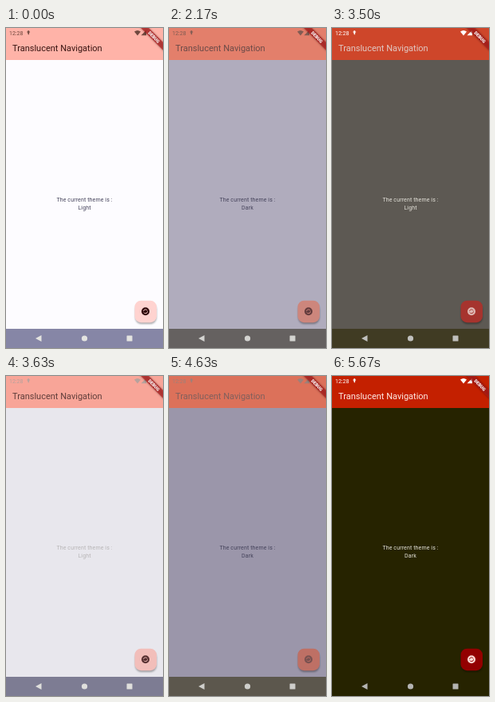
An HTML page for the animation above (5710 ms loop, 197x400 px).

```html
<!DOCTYPE html>
<html lang="en">
<head>
<meta charset="utf-8">
<title>Translucent Navigation</title>
<style>
  html, body { margin: 0; width: 100%; height: 100%; overflow: hidden; }
  svg { display: block; width: 100vw; height: 100vh; font-family: Roboto, Inter, sans-serif; }
  .body { font-size: 7px; letter-spacing: .125px; text-anchor: middle; }
  .debug { font-size: 5.6px; font-weight: 900; text-anchor: middle; fill: #fff; }
  .ring { fill: none; stroke-width: .9; stroke-dasharray: 6.4 1.5; }
</style>
</head>
<body>
<svg viewBox="0 0 197 400">
  <defs>
    <filter id="soft" x="-30%" y="-60%" width="160%" height="220%">
      <feGaussianBlur stdDeviation="1.2"/>
    </filter>
  </defs>

  <rect class="page" width="197" height="400"/>
  <rect class="bar" width="197" height="40"/>
  <text class="title" x="8" y="29" font-size="11">Translucent Navigation</text>

  <g class="status">
    <text x="4" y="8.6" font-size="7">12:28</text>
    <path d="M27.3 3.2h1.8v1.2h1v1h-1v1.6l-.9 1.8-.9-1.8V5.4h-1v-1h1z"/>
    <path d="M161 4.6Q165 1.4 169 4.6L165 9.4Z"/>
    <path d="M169.5 9.2L176 2.8V9.2Z"/>
  </g>

  <g class="body">
    <text x="98.5" y="217.3">The current theme is :</text>
    <text class="light" x="98.5" y="227.3">Light</text>
    <text class="dark" x="98.5" y="227.3">Dark</text>
  </g>

  <rect x="162" y="343.5" width="27" height="26.5" rx="8" fill="#000" opacity=".32" filter="url(#soft)"/>
  <rect class="fab" x="161.5" y="340.7" width="27.5" height="27.5" rx="8"/>
  <circle class="icon" cx="175" cy="354.3" r="5"/>
  <circle class="ring" cx="175" cy="354.3" r="2.5"/>

  <rect class="nav" y="376" width="197" height="24"/>
  <g class="keys">
    <path d="M37 388L44.5 384V392Z"/>
    <circle cx="98.5" cy="388" r="3.6"/>
    <rect x="151.5" y="384.5" width="7" height="7" rx=".5"/>
  </g>

  <g transform="translate(197 0) rotate(45)">
    <rect x="-24" y="12.6" width="48" height="7" fill="#000" opacity=".4" filter="url(#soft)"/>
    <rect x="-24" y="12.6" width="48" height="7" fill="#b71c1c" opacity=".68"/>
    <text class="debug" x="0" y="18.1">DEBUG</text>
  </g>
</svg>
<script>
  const LOOP = 5710;
  const FADE = 200;
  // [time of the toggle, theme it leads to]: 0 light, 1 dark
  const toggles = [[2100, 1], [3450, 0], [4540, 1]];

  // colours: light, dark and an optional tone halfway between
  function cycle(selector, prop, [light, dark, middle], lag = 0, fade = FADE) {
    const ends = [light, dark];
    const frames = [];
    const key = (time, value) => frames.push({ offset: time / LOOP, [prop]: value });
    key(0, light);
    for (const [time, theme] of toggles) {
      const start = time + (typeof lag === "function" ? lag(theme) : lag);
      key(start, ends[1 - theme]);
      if (middle) key(start + fade / 2, middle);
      key(start + fade, ends[theme]);
    }
    key(LOOP, dark);
    document.querySelector(selector).animate(frames, { duration: LOOP, iterations: Infinity });
  }

  const fab = ["#ffd3d0", "#930000", "#b8665a"];
  cycle(".page", "fill", ["#fdfcff", "#262300", "#918ca2"]);
  cycle(".bar", "fill", ["#ffb3a8", "#c42000", "#d86a52"]);
  cycle(".nav", "fill", ["#8686a6", "#262300", "#585244"]);
  cycle(".keys", "fill", ["#e4e4e0", "#b4b4b2"]);
  cycle(".fab", "fill", fab);
  cycle(".ring", "stroke", fab);
  // Text and icons trail the surfaces; system icons turn dark late.
  cycle(".title", "fill", ["#3a1512", "#ffe9e4"], 20);
  cycle(".icon", "fill", ["#2d0508", "#ffdad4"], 20);
  cycle(".body", "fill", ["#44425a", "#e6e4dc"], 100, 280);
  cycle(".status", "fill", ["#70483e", "#ffffff"], theme => theme ? 60 : 130, 100);
  cycle(".light", "opacity", [1, 0], 0, 0);
  cycle(".dark", "opacity", [0, 1], 0, 0);
</script>
</body>
</html>
```
